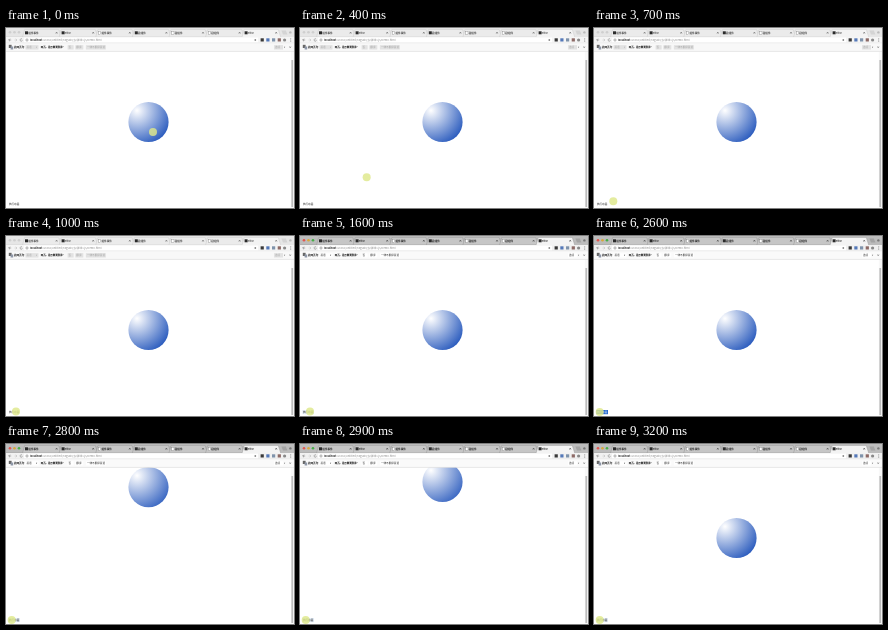
An HTML page with a canvas for the animation above (4000 ms loop, 288 by 180 pixels).

```html
<!DOCTYPE html>
<html lang="zh">
<head>
<meta charset="utf-8">
<title>Title</title>
<style>
html, body { margin: 0; width: 100%; height: 100%; overflow: hidden; background: #fff; }
canvas { display: block; width: 288px; height: 180px; }
</style>
</head>
<body>
<canvas id="stage"></canvas>
<script>
const W = 288, H = 180, LOOP = 4000, STEP = 100;
const FONT = '"Noto Sans CJK SC", "Noto Sans CJK", Roboto, sans-serif';
const canvas = document.getElementById('stage');
const ctx = canvas.getContext('2d');
const dpr = window.devicePixelRatio || 1;
canvas.width = W * dpr;
canvas.height = H * dpr;

const clamp = v => Math.max(0, Math.min(1, v));
const mix = (a, b, p) => a + (b - a) * p;
const span = (t, from, to) => clamp((t - from) / (to - from));
const easeOut = p => 1 - (1 - p) ** 2;

// CSS "ease": cubic-bezier(.25, .1, .25, 1)
function ease(x) {
  const curve = (s, a, b) => 3 * a * s * (1 - s) ** 2 + 3 * b * s * s * (1 - s) + s ** 3;
  let lo = 0, hi = 1;
  for (let i = 0; i < 24; i++) {
    const mid = (lo + hi) / 2;
    if (curve(mid, .25, .25) < x) lo = mid; else hi = mid;
  }
  return curve(lo, .1, 1);
}

function rect(x, y, w, h, color) {
  ctx.fillStyle = color;
  ctx.fillRect(x, y, w, h);
}

function shape(color, ...pts) {
  ctx.fillStyle = color;
  ctx.beginPath();
  for (let i = 0; i < pts.length; i += 2) ctx.lineTo(pts[i], pts[i + 1]);
  ctx.fill();
}

function disc(x, y, r, color) {
  ctx.fillStyle = color;
  ctx.beginPath();
  ctx.arc(x, y, r, 0, Math.PI * 2);
  ctx.fill();
}

function arc(x, y, r, from, to, color) {
  ctx.strokeStyle = color;
  ctx.lineWidth = .5;
  ctx.beginPath();
  ctx.arc(x, y, r, from, to);
  ctx.stroke();
}

function line(color, width, ...pts) {
  ctx.strokeStyle = color;
  ctx.lineWidth = width;
  ctx.beginPath();
  for (let i = 0; i < pts.length; i += 2) ctx.lineTo(pts[i], pts[i + 1]);
  ctx.stroke();
}

function text(str, x, y, size, color, weight = 400) {
  ctx.font = `${weight} ${size}px ${FONT}`;
  ctx.fillStyle = color;
  ctx.fillText(str, x, y);
}

function cross(x, y, r, color) {
  line(color, .5, x - r, y - r, x + r, y + r);
  line(color, .5, x - r, y + r, x + r, y - r);
}

function tabs(active) {
  const bar = active ? '#bcbcbc' : '#e6e6e6';
  const tab = active ? '#c6c6c6' : '#ebebeb';
  const edge = active ? '#8f8f8f' : '#c6c6c6';
  const ink = active ? '#222' : '#444';
  rect(0, 0, W, 9, bar);
  const lights = active ? ['#e2564f', '#d9a83a', '#46ae48'] : ['#cfcfcf', '#cfcfcf', '#cfcfcf'];
  lights.forEach((c, i) => disc(4 + i * 4.5, 4.3, 1.3, c));

  const titles = ['组件事件', 'Title', '组件事件', '微组件', '微组件', '微组件', 'Title'];
  const darkIcons = [0, 1, 3, 6];
  titles.forEach((title, i) => {
    const x = 17.5 + i * 36.6, last = i === titles.length - 1;
    const outline = [x - 1, 9, x + 1.2, 1.4, x + 35.2, 1.4, x + 37.6, 9];
    shape(last ? '#f3f3f3' : tab, ...outline);
    line(edge, .4, ...outline);
    if (darkIcons.includes(i)) rect(x + 1.5, 3.3, 3, 3, '#2b2b2b');
    else {
      rect(x + 1.8, 3.3, 2.3, 3.2, '#fff');
      ctx.strokeStyle = '#777';
      ctx.lineWidth = .35;
      ctx.strokeRect(x + 1.8, 3.3, 2.3, 3.2);
    }
    text(title, x + 4.8, 5.9, 2.6, ink, 700);
    cross(x + 33.1, 4.8, .75, ink);
  });
  line(edge, .4, 0, 8.9, 236, 8.9);
  shape(active ? '#a4a4a4' : '#d4d4d4', 275.4, 2.6, 279.8, 2.6, 281.4, 6.4, 277, 6.4);
  disc(284.4, 4.4, 1.2, active ? '#777' : '#bbb');
}

function addressBar(active) {
  rect(0, 9, W, 6.2, active ? '#f1f1f1' : '#f5f5f5');
  rect(18, 9.6, 234, 4.8, '#fff');
  const ink = '#666';
  line(ink, .5, 4, 10.7, 2.7, 12, 4, 13.3);
  line(ink, .5, 2.7, 12, 5.2, 12);
  line('#bbb', .5, 9.7, 10.7, 11, 12, 9.7, 13.3);
  line('#bbb', .5, 8.5, 12, 11, 12);
  arc(15.3, 12, 1.2, .3, 5.5, ink);
  arc(21, 12, 1.1, 0, 7, ink);
  text('localhost', 23.9, 12.8, 2.75, '#222', 700);
  text(':63342/untitled/TagsDiv/js/弹球1.js/Demo.html', 36.8, 12.8, 2.7, '#888');
  disc(249.3, 12, .9, '#888');
  ['#383838', '#5478b8', '#7f93ab', '#8d6a66'].forEach((c, i) => rect(254.6 + i * 5.7, 10.3, 3.2, 3.2, c));
  disc(278.6, 12, 1.6, '#888');
  for (let i = 0; i < 3; i++) disc(284.8, 10.7 + i * 1.3, .45, '#666');
  line('#d0d0d0', .5, 0, 15.2, W, 15.2);
}

function translateBar(active) {
  rect(0, 15.4, W, 8.1, active ? '#fafafa' : '#f8f8f8');
  rect(2.8, 16.8, 2.8, 3.2, '#666');
  rect(4.6, 18.5, 2.6, 3, '#8f98a8');
  const button = (x, w, label) => {
    rect(x - 1, 17.2, w, 4.3, active ? '#fff' : '#e2e2e2');
    text(label, x, 20.1, 2.6, active ? '#222' : '#a0a0a0', 500);
  };
  text('此网页为', 7.9, 20.1, 2.6, '#111', 700);
  button(20.5, 13, '英语');
  text('▾', 30, 20.1, 2.4, active ? '#333' : '#aaa');
  text('网页。是否需要翻译？', 34.8, 20.1, 2.4, '#111', 700);
  button(62.6, 6, '否');
  button(70.3, 8, '翻译');
  button(80.9, 20, '一律不翻译英语');
  button(269, 9, '选项');
  text('▾', 278, 20.1, 2.4, '#555');
  cross(284.2, 19.2, .75, '#666');
  line('#d0d0d0', .5, 0, 23.4, W, 23.4);
}

function ball(t) {
  const start = 2645, half = 250;
  const up = ease(span(t, start, start + half));
  const down = ease(span(t, start + half, start + half * 2));
  const lift = up - down;
  const x = 142.5, y = 94 - 56.7 * lift;
  const shade = ctx.createRadialGradient(x - 11.5, y - 11.5, 0, x - 11.5, y - 11.5, 42);
  shade.addColorStop(0, '#fff');
  shade.addColorStop(1, '#0b43b4');
  ctx.globalAlpha = 1 - .08 * lift;
  disc(x, y, 20.1, shade);
  ctx.globalAlpha = 1;
}

function runButton(t) {
  const pressed = t >= 2600 && t < 2700;
  if (t >= 1600) rect(2.4, 174, 11.6, 4.2, pressed ? '#2166cf' : '#e4edf7');
  text('执行动画', 3, 177.2, 2.55, pressed ? '#fff' : '#111', 500);
}

function pointer(t) {
  const glide = span(t, 0, 600);
  const slow = easeOut(span(t, 600, 1000));
  const nudge = span(t, 2100, 2300);
  const x = mix(147, 26.5, glide) - 16.5 * slow - 4.3 * nudge;
  const y = mix(104, 171.7, glide) + 3.8 * slow + .4 * nudge;
  disc(x, y, 4, 'rgba(222,232,138,.82)');
}

function draw(t) {
  const active = t >= 1600;
  ctx.setTransform(dpr, 0, 0, dpr, 0, 0);
  rect(0, 0, W, H, '#fff');
  ball(t);
  runButton(t);
  rect(284.8, 23.6, 3.2, 156.4, '#f8f8f8');
  rect(285.4, 32, 1.7, 147, '#bcbcbc');
  tabs(active);
  addressBar(active);
  translateBar(active);
  pointer(t);
}

function tick() {
  const t = performance.now() % LOOP;
  draw(Math.floor(t / STEP) * STEP);
  requestAnimationFrame(tick);
}
tick();
</script>
</body>
</html>
```
